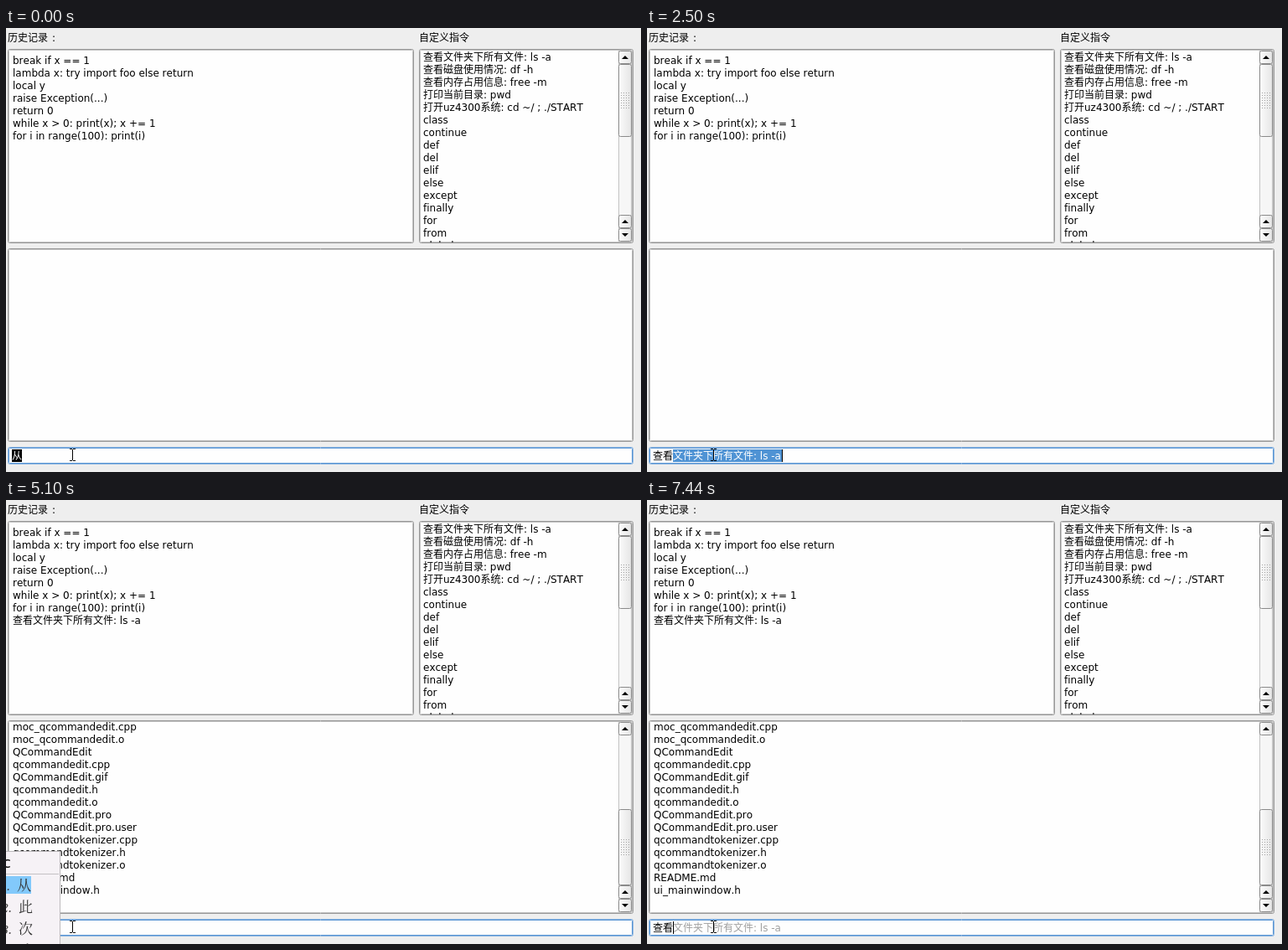
Recreate the animation shown at these times as an HTML page with a canvas. Size 758 px wide and 530 px high, loop 8 s.

```html
<!DOCTYPE html>
<html lang="zh-CN">
<head>
<meta charset="utf-8">
<title>Command completion</title>
<style>
html, body { margin: 0; width: 100%; height: 100%; overflow: hidden; background: #eee; }
canvas { display: block; }
</style>
</head>
<body>
<canvas id="stage" width="758" height="530"></canvas>
<script>
const ctx = document.getElementById('stage').getContext('2d');
const LOOP = 8000;
const UI = '12px "DejaVu Sans", "Noto Sans CJK SC", sans-serif';
const HEAD = '18px "DejaVu Sans", sans-serif';
const SONG = '17px "Noto Serif CJK SC", "Noto Sans CJK SC", serif';
const DIGIT = 'italic 15px "Noto Serif", serif';

// Plain glyph advances: no kerning, no ligatures.
ctx.fontKerning = 'none';
ctx.textRendering = 'optimizeSpeed';

const TYPED = '查看';
const REST = '文件夹下所有文件: ls -a';
const HISTORY = [
  'break if x == 1', 'lambda x: try import foo else return', 'local y',
  'raise Exception(...)', 'return 0', 'while x > 0: print(x); x += 1',
  'for i in range(100): print(i)'
];
const COMMANDS = [
  TYPED + REST, '查看磁盘使用情况: df -h', '查看内存占用信息: free -m',
  '打印当前目录: pwd', '打开uz4300系统: cd ~/ ; ./START',
  'class', 'continue', 'def', 'del', 'elif', 'else', 'except',
  'finally', 'for', 'from', 'global'
];
const OUTPUT = [
  'moc_qcommandedit.cpp', 'moc_qcommandedit.o', 'QCommandEdit', 'qcommandedit.cpp',
  'QCommandEdit.gif', 'qcommandedit.h', 'qcommandedit.o', 'QCommandEdit.pro',
  'QCommandEdit.pro.user', 'qcommandtokenizer.cpp', 'qcommandtokenizer.h',
  'qcommandtokenizer.o', 'README.md', 'ui_mainwindow.h'
];
const CANDIDATES = {
  c: ['从', '此', '次', '才'],
  ch: ['出', '成', '吃', '场'],
  k: ['查看', '察看', '岔开', '叉开'],
  ka: ['插卡', '查卡', '茶卡', '岔开'],
  kan: ['查看', '察看', '查勘', '查堪']
};

// Each step: start time, what the input shows, and the popup keys or caret state.
const STEPS = [
  [0, 'preedit'],
  [400, 'popup', 'c'], [520, 'popup', 'ch'], [640, 'popup', 'k'],
  [790, 'popup', 'ka'], [940, 'popup', 'kan'],
  [1350, 'typed', false], [1500, 'typed', true], [2090, 'typed', false],
  [2500, 'selected', true], [3060, 'selected', false], [3470, 'selected', true],
  [3750, 'empty', true], [4030, 'empty', false], [4460, 'empty', true],
  [4980, 'preedit'],
  [5100, 'popup', 'c'], [5250, 'popup', 'ch'], [5400, 'popup', 'k'],
  [5550, 'popup', 'ka'], [5670, 'popup', 'kan'],
  [6080, 'hinted', false], [6480, 'hinted', true],
  [6910, 'hinted', false], [7440, 'hinted', true]
];
const RUN_AT = 3750;

function rect(x, y, w, h, color) {
  ctx.fillStyle = color;
  ctx.fillRect(x, y, w, h);
}

function text(str, x, y, color = '#000', font = UI) {
  ctx.font = font;
  ctx.fillStyle = color;
  ctx.fillText(str, x, y);
}

function box(x, y, w, h, fill, stroke, r = 2) {
  ctx.beginPath();
  ctx.roundRect(x + .5, y + .5, w - 1, h - 1, r);
  ctx.fillStyle = fill;
  ctx.fill();
  ctx.strokeStyle = stroke;
  ctx.lineWidth = 1;
  ctx.stroke();
}

function panel(x, y, w, h, outer = '#979797', inner = '#c4c4c4') {
  box(x, y, w, h, '#fefefe', outer);
  box(x + 1, y + 1, w - 2, h - 2, '#fefefe', inner, 1);
}

function list(rows, x, y, clip) {
  ctx.save();
  ctx.beginPath();
  ctx.rect(...clip);
  ctx.clip();
  rows.forEach((row, i) => text(row, x, y + 15 * i));
  ctx.restore();
}

function metal(y, h) {
  const g = ctx.createLinearGradient(731, 0, 747, 0);
  g.addColorStop(0, '#fcfcfc');
  g.addColorStop(1, '#e4e4e4');
  box(731, y, 16, h, g, '#8a8a8a');
}

function button(y, dir) {
  metal(y, 16);
  const mid = y + 8;
  ctx.beginPath();
  ctx.moveTo(735, mid + 2 * dir);
  ctx.lineTo(743, mid + 2 * dir);
  ctx.lineTo(739, mid - 2 * dir);
  ctx.fillStyle = '#000';
  ctx.fill();
}

function scrollbar(top, bottom, from, to) {
  rect(731, top, 16, bottom - top, '#f6f6f6');
  rect(731, top, 1, bottom - top, '#c4c4c4');
  rect(746, top, 1, bottom - top, '#c4c4c4');
  button(top, 1);
  metal(from, to - from);
  const mid = Math.floor((from + to) / 2);
  for (let row = 0; row < 7; row++)
    for (let col = 0; col < 4; col++)
      rect(734 + col * 3, mid - 9 + row * 3, 1, 1, '#a2a2a2');
  button(bottom - 32, 1);
  button(bottom - 16, -1);
}

function drawWindow(ran) {
  rect(0, 0, 758, 530, '#eeeeee');
  text('历史记录', 2, 16);
  text(':', 55, 16);
  text('自定义指令', 493, 16);

  panel(2, 25, 485, 232);
  list(ran ? [...HISTORY, TYPED + REST] : HISTORY, 8, 43, [4, 27, 480, 228]);

  panel(493, 25, 256, 232);
  list(COMMANDS, 498, 39, [495, 27, 235, 229]);
  scrollbar(27, 255, 43, 130);

  panel(2, 263, 747, 231);
  if (ran) {
    list(OUTPUT, 8, 275, [4, 265, 725, 227]);
    scrollbar(265, 492, 369, 460);
  }
}

function drawInput(mode, caret) {
  panel(2, 500, 747, 21, '#86b1df', '#5b96d4');
  if (mode === 'preedit') {
    rect(7, 503, 12, 15, '#000');
    text('从', 7, 515, '#fff');
  }
  if (['typed', 'selected', 'hinted'].includes(mode)) text(TYPED, 7, 515);
  if (mode === 'selected') {
    rect(31, 503, 130, 15, '#4f93d4');
    text(REST, 31, 515, '#fff');
  }
  if (mode === 'hinted') text(REST, 31, 515, '#a0a0a0');
  if (caret === true) {
    const x = { empty: 7, selected: 161 }[mode] || 31;
    rect(x, 503, 1, 15, '#000');
  }
}

function drawPopup(keys) {
  rect(0, 419, 65, 111, '#f6f2f6');
  rect(0, 419, 65, 1, '#bdbabd');
  rect(64, 419, 1, 111, '#bdbabd');
  rect(0, 446, 63, 1, '#c4c1c4');
  text(keys, -4, 439, '#000', HEAD);
  CANDIDATES[keys].forEach((word, i) => {
    const y = 466 + 26 * i;
    const x = i ? 15 : 13;
    if (!i) rect(0, 449, 13 + 17 * word.length, 21, '#82c9fb');
    ctx.textAlign = 'right';
    text(i + 1 + '.', x - 8, y, '#444', DIGIT);
    ctx.textAlign = 'left';
    text(word, x, y, '#333', SONG);
  });
}

function drawPointer() {
  rect(79, 503, 1, 13, '#000');
  for (const y of [502, 516]) {
    rect(76, y, 3, 1, '#000');
    rect(80, y, 3, 1, '#000');
  }
}

function draw(t) {
  const [, mode, detail] = STEPS.findLast(step => step[0] <= t);
  drawWindow(t >= RUN_AT);
  drawInput(mode, detail);
  if (mode === 'popup') drawPopup(detail);
  drawPointer();
}

const start = performance.now();
function tick() {
  draw((performance.now() - start) % LOOP);
  requestAnimationFrame(tick);
}
tick();
</script>
</body>
</html>
```
